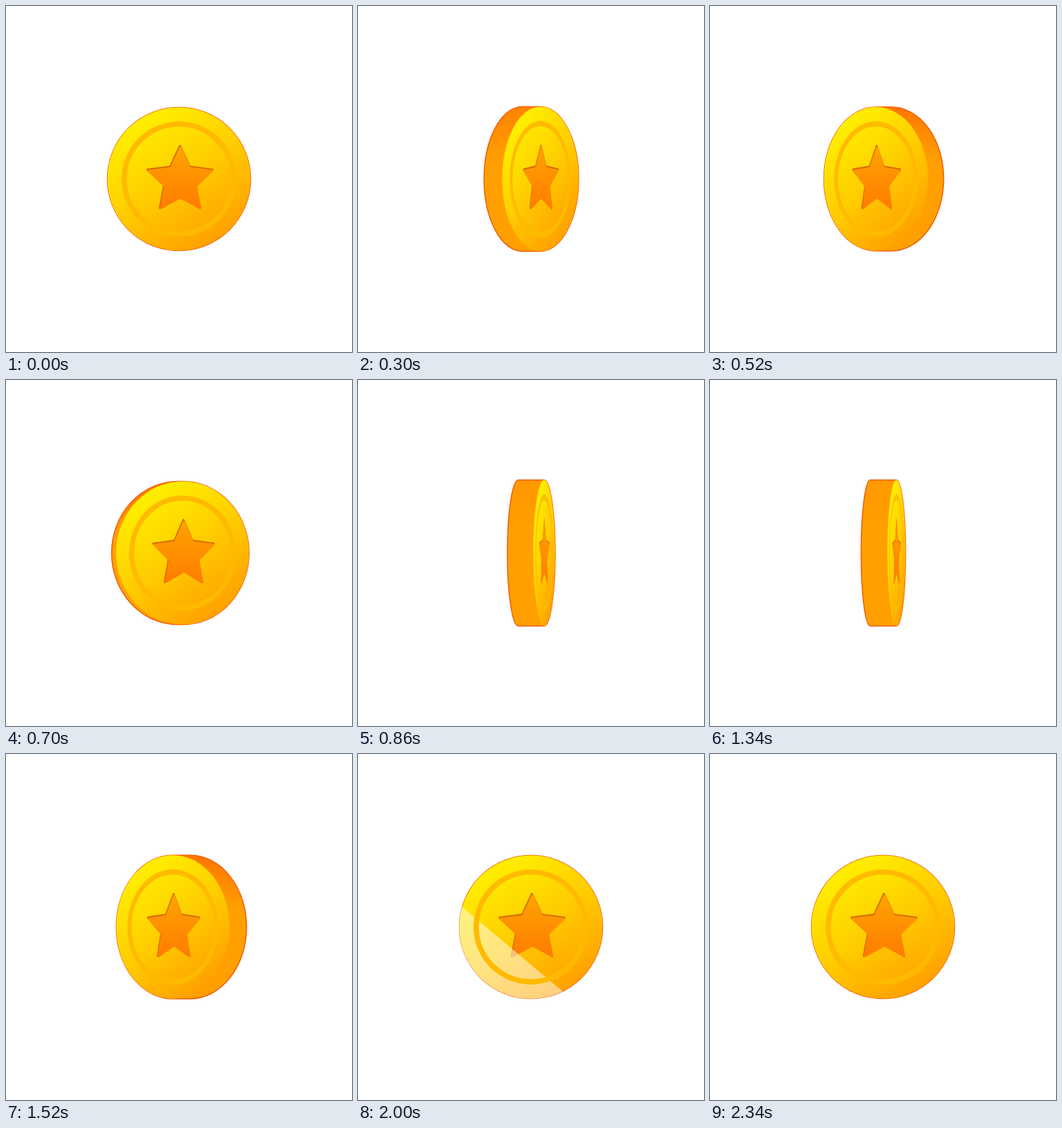
An HTML page that plays this animation: 500x500 px, repeating every 3600 ms.

```html
<!DOCTYPE html>
<html lang="en">
<head>
<meta charset="utf-8">
<title>Spinning coin</title>
<style>
  html, body { margin: 0; width: 100%; height: 100%; overflow: hidden; background: #fff; }
  svg { display: block; width: 100%; height: 100%; }
</style>
</head>
<body>
<svg viewBox="0 0 500 500">
  <defs>
    <linearGradient id="gold" gradientUnits="userSpaceOnUse" x1="-54" y1="-84" x2="58" y2="90">
      <stop offset="0" stop-color="#ffee00"/>
      <stop offset=".5" stop-color="#ffcb00"/>
      <stop offset="1" stop-color="#ff9f00"/>
    </linearGradient>
    <linearGradient id="amber" gradientUnits="userSpaceOnUse" x1="0" y1="-46" x2="0" y2="40">
      <stop offset="0" stop-color="#ffa200"/>
      <stop offset="1" stop-color="#ff7c00"/>
    </linearGradient>
    <linearGradient id="shade" gradientUnits="userSpaceOnUse" x1="0" y1="146" x2="0" y2="225">
      <stop offset="0" stop-color="#ff6a00"/>
      <stop offset="1" stop-color="#ff6a00" stop-opacity="0"/>
    </linearGradient>
    <clipPath id="disc"><circle r="104"/></clipPath>
  </defs>
  <path id="side" fill="#ffa000" stroke="#f25a00" stroke-width="1.5"/>
  <path id="dim" fill="url(#shade)"/>
  <g id="face">
    <circle r="103.5" fill="url(#gold)"/>
    <g stroke-width="3" stroke-linejoin="round">
      <path class="star" transform="translate(1.4 1.7)" fill="#d66c00" stroke="#d66c00"/>
      <path class="star" transform="translate(2.1 3.2) scale(.975)" fill="url(#amber)" stroke="url(#amber)"/>
    </g>
    <g clip-path="url(#disc)">
      <g transform="rotate(-50)">
        <rect id="sheen" y="-150" width="71" height="300" fill="#fff" opacity=".5"/>
      </g>
    </g>
    <circle r="79.2" fill="none" stroke="#ffba00" stroke-width="7.6"/>
  </g>
</svg>
<script>
  const LOOP = 3600, SPIN_END = 1760, CENTER = 250, RADIUS = 103.5, DEPTH = 0.235;
  const RAD = Math.PI / 180;
  const el = id => document.getElementById(id);
  const side = el('side'), dim = el('dim'), face = el('face'), sheen = el('sheen');
  const clamp = (v, lo, hi) => Math.max(lo, Math.min(hi, v));

  // time (ms), angle (deg), speed (deg/ms)
  const spin = [
    [0, 0, 0],
    [520, 136.3, .36],
    [860, 260.8, .378],
    [1160, 375, .375],
    [1520, 502, .29],
    [SPIN_END, 540, 0]
  ];

  function angleAt(t) {
    if (t >= SPIN_END) return 540;
    const i = spin.findIndex(k => k[0] > t);
    const [t0, a0, v0] = spin[i - 1], [t1, a1, v1] = spin[i];
    const d = t1 - t0, u = (t - t0) / d, w = 1 - u;
    return a0 * w * w * (1 + 2 * u) + a1 * u * u * (3 - 2 * u)
      + d * u * w * (v0 * w - v1 * u);
  }

  function starPath(outer, inner) {
    let d = '';
    for (let i = 0; i < 10; i++) {
      const r = i % 2 ? inner : outer, a = i * 36 * RAD;
      d += (i ? 'L' : 'M') + (r * Math.sin(a)).toFixed(2) + ' ' + (-r * Math.cos(a)).toFixed(2);
    }
    return d + 'Z';
  }

  function draw(t) {
    const a = angleAt(t);
    const tilt = a - 180 * Math.round(a / 180);
    const cos = Math.max(Math.cos(tilt * RAD), .001);
    const ry = RADIUS + 2 * Math.sin(tilt * RAD) ** 4;
    const rx = RADIUS * cos;

    // the rear rim drifts right as the spin goes on, but stays within the coin's radius
    const drift = 8.8 * cos * Math.min(1, t / 1500);
    const room = RADIUS - rx;
    const front = CENTER + DEPTH * tilt;
    const rear = CENTER + clamp(drift - DEPTH * tilt, -room, room);

    const left = Math.min(front, rear), right = Math.max(front, rear);
    const top = CENTER - ry, low = CENTER + ry;
    const d = `M${left} ${top}L${right} ${top}A${rx} ${ry} 0 0 1 ${right} ${low}`
      + `L${left} ${low}A${rx} ${ry} 0 0 1 ${left} ${top}Z`;
    side.setAttribute('d', d);
    dim.setAttribute('d', d);
    dim.setAttribute('opacity', cos);
    face.setAttribute('transform',
      `translate(${front} ${CENTER}) scale(${cos} ${ry / RADIUS})`);

    const edge = -42.5 + .65 * (t - 2000);
    sheen.setAttribute('x', edge - 71);
    sheen.setAttribute('visibility', t >= 1910 && t < 2340 ? 'visible' : 'hidden');
  }

  document.querySelectorAll('.star').forEach(s => s.setAttribute('d', starPath(49.5, 24)));

  const start = performance.now();
  function tick() {
    draw((performance.now() - start) % LOOP);
    requestAnimationFrame(tick);
  }
  tick();
</script>
</body>
</html>
```
